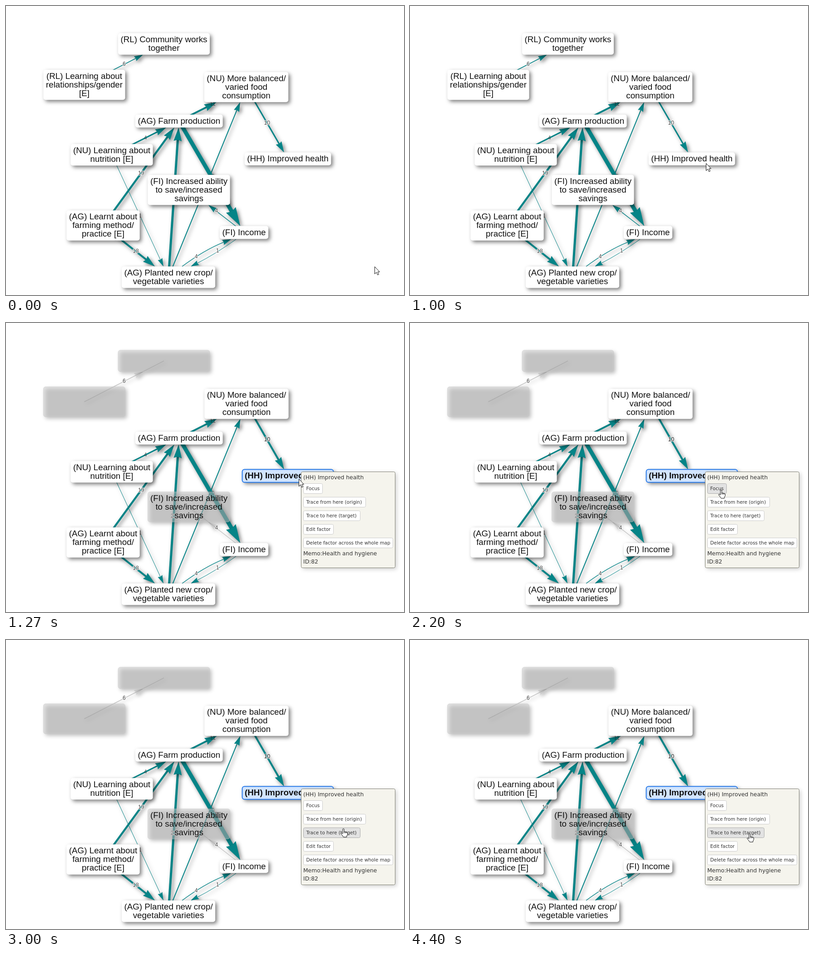
An HTML page with a canvas for the animation above (8000 ms loop, 877x638 px).

```html
<!DOCTYPE html>
<html lang="en">
<head>
<meta charset="utf-8">
<style>
html, body { margin: 0; width: 100%; height: 100%; overflow: hidden; background: #fff }
canvas { display: block }
</style>
</head>
<body>
<canvas id="stage" width="877" height="638"></canvas>
<script>
const ctx = document.getElementById('stage').getContext('2d');
const LOOP = 8000, SELECT_AT = 1200;
const TEAL = '#058487', FADED = 'rgba(200,200,200,.5)', FADED_LINE = 'rgba(160,160,160,.6)';
const SANS = '"Liberation Sans", Arial, sans-serif', UI = '"DejaVu Sans", Verdana, sans-serif';
const FONT_SIZE = 18.8, LINE_HEIGHT = 19;

const nodes = {
  works: { x: 348, y: 83.7, text: '(RL) Community works|together', off: true, blank: true },
  gender: { x: 172.5, y: 174, text: '(RL) Learning about|relationships/gender|[E]', off: true, blank: true },
  food: { x: 529.5, y: 179, text: '(NU) More balanced/|varied food|consumption' },
  farm: { x: 381.3, y: 254, text: '(AG) Farm production' },
  nutrition: { x: 233, y: 328.5, text: '(NU) Learning about|nutrition [E]' },
  health: { x: 621, y: 337.5, text: '(HH) Improved health', pick: true },
  savings: { x: 403, y: 406, text: '(FI) Increased ability|to save/increased|savings', off: true },
  method: { x: 214, y: 484.5, text: '(AG) Learnt about|farming method/|practice [E]' },
  income: { x: 524.5, y: 500, text: '(FI) Income' },
  crop: { x: 358, y: 598.7, text: '(AG) Planted new crop/|vegetable varieties' }
};

const edges = [
  { from: 'gender', to: 'works', w: 1.5, label: '6', off: true },
  { from: 'farm', to: 'food', w: 4, label: '11', dim: true },
  { from: 'nutrition', to: 'farm', w: 3, label: '4', dim: true },
  { from: 'method', to: 'farm', w: 4.3, label: '19' },
  { from: 'crop', to: 'farm', w: 5, label: '21' },
  { from: 'crop', to: 'food', w: 2, label: '' },
  { from: 'farm', to: 'income', w: 8.7, label: '20', dim: true },
  { from: 'food', to: 'health', w: 3, label: '10', pick: true },
  { from: 'nutrition', to: 'crop', w: 1, label: '1' },
  { from: 'method', to: 'crop', w: 4, label: '18' },
  { from: 'income', to: 'savings', w: 1.4, label: '4', off: true },
  { w: 1.4, label: '4', curve: [388, 575, 438, 538, 496, 515], at: [419, 554] },
  { w: 1, label: '1', curve: [507, 515, 459, 549, 407, 575], at: [466, 541] }
];

const buttons = [
  [355, 43, 'Focus'],
  [385, 138, 'Trace from here (origin)'],
  [415, 126, 'Trace to here (target)'],
  [445, 67, 'Edit factor'],
  [475.5, 198, 'Delete factor across the whole map']
];

// Pointer path: time, x, y
const path = [
  [0, 812, 575], [400, 752, 478], [867, 673, 367], [1000, 652, 347], [1134, 645, 344],
  [1270, 645, 344], [1600, 642, 344], [2000, 642, 344], [2200, 685, 368], [2867, 738, 410],
  [3000, 743, 416], [3267, 747, 427], [3467, 748, 427], [LOOP, 748, 427]
];
const ARROW = new Path2D('M0 0V16l3.8-3.6 2.5 5.8 2.6-1.1-2.4-5.6h4.4z');
const HAND = new Path2D('M-1.5 11V1.5a1.5 1.5 0 0 1 3 0V7l1.5-.5 2 .8 2 .5 2 1.2v4l-1.8 3.5v2H0l-1.8-3-3.6-4.3c-.8-1.2.6-2.2 1.8-1.4z');

function shadow(size = 0, offset = 0, alpha = 0) {
  ctx.shadowColor = `rgba(0,0,0,${alpha})`;
  ctx.shadowBlur = size;
  ctx.shadowOffsetX = ctx.shadowOffsetY = offset;
}
const dropShadow = () => shadow(8, 4, .5);

function write(text, x, y, font, color, align = 'center') {
  ctx.font = font;
  ctx.fillStyle = color;
  ctx.textAlign = align;
  ctx.textBaseline = 'middle';
  ctx.fillText(text, x, y);
}

function roundBox(x, y, w, h, r, fill, stroke, lineWidth = 1) {
  ctx.beginPath();
  ctx.roundRect(x, y, w, h, r);
  ctx.fillStyle = fill;
  ctx.fill();
  shadow();
  if (!stroke) return;
  ctx.strokeStyle = stroke;
  ctx.lineWidth = lineWidth;
  ctx.stroke();
}

const nodeFont = bold => `${bold ? 'bold ' : ''}${FONT_SIZE}px ${SANS}`;

function measure(node, bold) {
  const lines = node.text.split('|');
  ctx.font = nodeFont(bold);
  const w = Math.max(...lines.map(s => ctx.measureText(s).width)) + 11;
  return { lines, w, h: lines.length * LINE_HEIGHT + 9.5 };
}

function borderPoint(node, other) {
  const { w, h } = measure(node), dx = other.x - node.x, dy = other.y - node.y;
  const k = Math.min(w / 2 / Math.abs(dx), h / 2 / Math.abs(dy));
  return [node.x + dx * k, node.y + dy * k];
}

function drawEdge(e, selected) {
  const faded = selected && e.off;
  const width = e.w + (selected && e.pick ? 1 : 0);
  const size = 15 + 3 * width, back = size * .9;
  let start, bend, tip, mid;
  if (e.curve) {
    start = e.curve.slice(0, 2);
    bend = e.curve.slice(2, 4);
    tip = e.curve.slice(4);
    mid = e.at;
  } else {
    const a = nodes[e.from], b = nodes[e.to];
    start = bend = [a.x, a.y];
    tip = borderPoint(b, a);
    mid = [(a.x + b.x) / 2, (a.y + b.y) / 2];
  }
  const angle = Math.atan2(tip[1] - bend[1], tip[0] - bend[0]);
  const end = faded ? [nodes[e.to].x, nodes[e.to].y]
    : [tip[0] - back * Math.cos(angle), tip[1] - back * Math.sin(angle)];

  dropShadow();
  ctx.strokeStyle = faded ? FADED_LINE : TEAL;
  ctx.fillStyle = faded ? FADED : TEAL;
  ctx.lineWidth = width;
  ctx.beginPath();
  ctx.moveTo(...start);
  ctx.quadraticCurveTo(...bend, ...end);
  ctx.stroke();

  ctx.save();
  ctx.translate(...tip);
  ctx.rotate(angle);
  ctx.beginPath();
  ctx.moveTo(0, 0);
  ctx.lineTo(-size, size * .3);
  ctx.lineTo(-back, 0);
  ctx.lineTo(-size, -size * .3);
  ctx.fill();
  ctx.restore();

  shadow();
  const font = `12px ${SANS}`;
  if (!e.dim) {
    ctx.font = font;
    ctx.textAlign = 'center';
    ctx.textBaseline = 'middle';
    ctx.lineJoin = 'round';
    ctx.strokeStyle = '#fff';
    ctx.lineWidth = 2;
    ctx.strokeText(e.label, ...mid);
  }
  write(e.label, ...mid, font, e.dim ? 'rgba(40,50,50,.7)' : selected && e.pick ? '#111' : '#444');
}

function drawNode(node, selected) {
  const picked = selected && node.pick, faded = selected && node.off;
  const { lines, w, h } = measure(node, picked);
  const { x, y } = node;
  dropShadow();
  roundBox(x - w / 2, y - h / 2, w, h, 5, picked ? '#d2e5ff' : faded ? FADED : '#fff',
    picked ? '#2b7ce9' : faded ? FADED : null, picked ? 2 : 1);
  if (faded && node.blank) return;
  const top = y + .7 - (lines.length - 1) / 2 * LINE_HEIGHT;
  lines.forEach((line, i) => write(line, x, top + i * LINE_HEIGHT, nodeFont(picked), '#111'));
}

const isOver = ([top, width], x, y) => x >= 655 && x <= 655 + width && y >= top - 1 && y <= top + 22;

function drawPopup(x, y, pressed) {
  shadow(10, 3, .2);
  roundBox(650.5, 328.5, 207, 212, 3, '#f5f4ed', '#808074');
  const note = (text, ty) => write(text, 655, ty, `12.3px ${UI}`, '#333', 'left');
  note('(HH) Improved health', 342.2);
  note('Memo:Health and hygiene', 510.3);
  note('ID:82', 527.8);
  for (const b of buttons) {
    const [top, width, text] = b, over = isOver(b, x, y);
    roundBox(655.5, Math.floor(top) - .5, width - 1, 22, 3,
      over ? pressed ? '#d4d4d4' : '#e2e2e2' : '#fff', over ? '#adadad' : '#ccc');
    write(text, 661.5, top + 10.8, `10.4px ${UI}`, '#333', 'left');
  }
}

function pointerAt(t) {
  const i = Math.max(1, path.findIndex(p => p[0] >= t));
  const [t0, x0, y0] = path[i - 1], [t1, x1, y1] = path[i];
  const k = (t - t0) / (t1 - t0);
  return [Math.round(x0 + (x1 - x0) * k), Math.round(y0 + (y1 - y0) * k)];
}

function drawPointer(x, y, hand) {
  const shape = hand ? HAND : ARROW;
  ctx.save();
  ctx.translate(x + .5, y + .5);
  ctx.fillStyle = '#fff';
  ctx.strokeStyle = '#111';
  ctx.lineWidth = 1;
  ctx.fill(shape);
  ctx.stroke(shape);
  if (hand) {
    ctx.beginPath();
    for (const fx of [1.5, 4, 6.5]) {
      ctx.moveTo(fx, 7);
      ctx.lineTo(fx, 10);
    }
    ctx.stroke();
  }
  ctx.restore();
}

function render(now) {
  // Time advances in 15 steps per second
  const t = Math.floor((now % LOOP + 4) * .015) / .015;
  const selected = t >= SELECT_AT - 1;
  const [x, y] = pointerAt(t);
  nodes.food.x = selected ? 530 : 529.5;
  nodes.food.y = selected ? 178.5 : 179;
  shadow();
  ctx.fillStyle = '#fff';
  ctx.fillRect(0, 0, 877, 638);
  edges.forEach(e => drawEdge(e, selected));
  Object.values(nodes).forEach(n => drawNode(n, selected));
  if (selected) drawPopup(x, y, t > 4260 && t < 4399);
  drawPointer(x, y, selected && buttons.some(b => isOver(b, x, y)));
}

const began = performance.now();
function tick() {
  render(performance.now() - began);
  requestAnimationFrame(tick);
}
tick();
</script>
</body>
</html>
```
